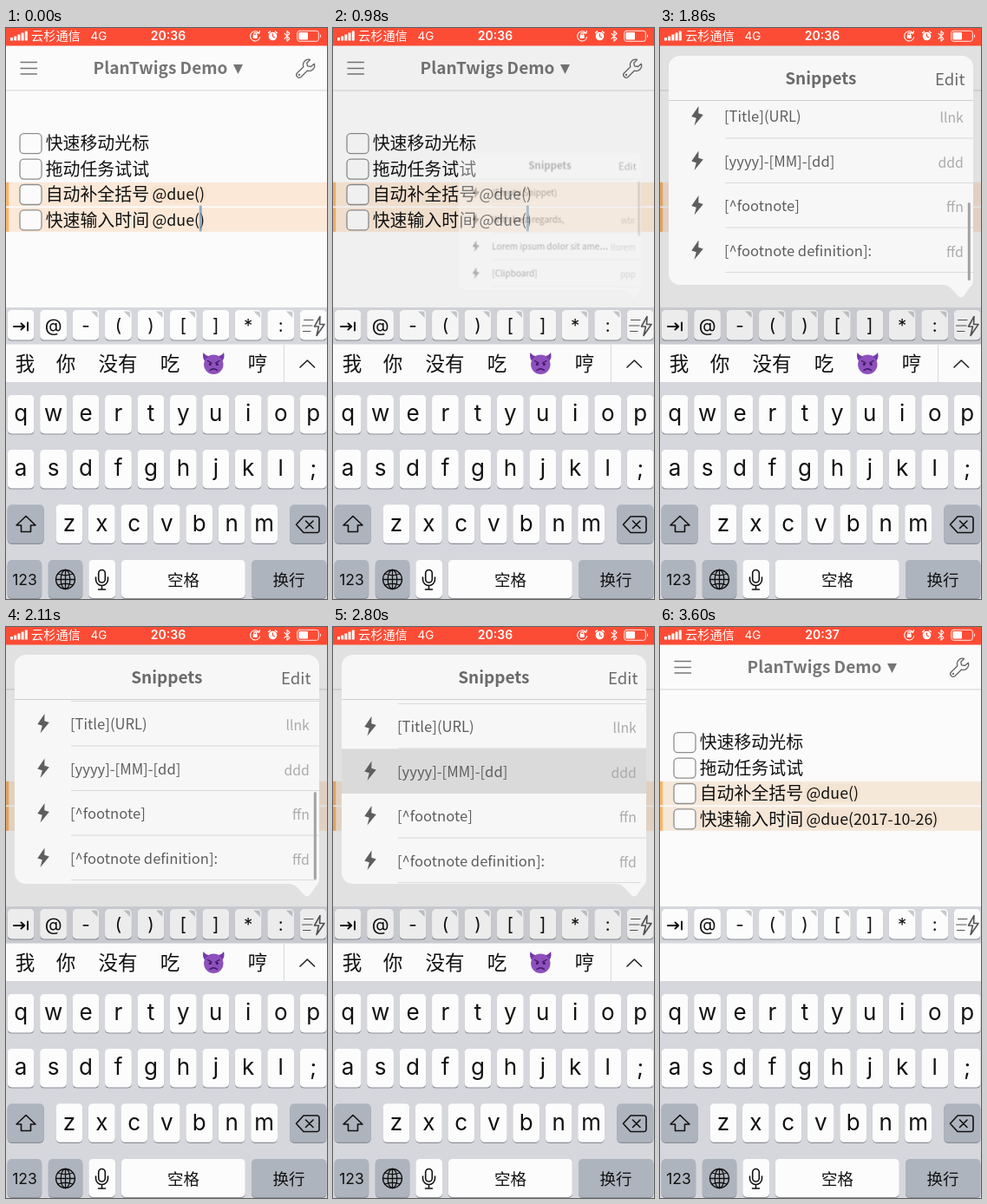
These frames come from a looping animation (370 by 658 pixels, 4000 ms). An HTML page:

```html
<!DOCTYPE html>
<html lang="zh-CN">
<head>
<meta charset="utf-8">
<title>Snippets demo</title>
<style>
html, body { margin: 0; width: 100%; height: 100%; overflow: hidden; background: #fbfbfb; }
svg { display: block; width: 370px; height: 658px; }
text { font-family: "Noto Sans CJK SC", "Noto Sans CJK", "Noto Sans", sans-serif; }
.ui { font-family: Inter, Roboto, sans-serif; }
.mid { text-anchor: middle; }
.end { text-anchor: end; }
.bold { font-weight: 700; }
.line { fill: none; stroke-linecap: round; stroke-linejoin: round; }

/* the whole loop is stepped, like a low frame rate screen recording */
.anim, .before, .after, .mark { animation: 4s step-end infinite; }
.before { animation-name: before; }
.after { animation-name: after; }
.mark { animation-name: mark; }
#caret { animation-name: blink; }
#dim { animation-name: dim; }
#pop { animation-name: pop; transform-origin: 347px 311px; }
#rows { animation-name: scroll; }
#bar { animation-name: bar; }
#pick { animation-name: pick; }

@keyframes before { 0% { opacity: 1 } 72.25%, 100% { opacity: 0 } }
@keyframes after { 0% { opacity: 0 } 72.25%, 100% { opacity: 1 } }
@keyframes mark { 0% { fill: #fbe8d7 } 72.25%, 100% { fill: #f6e8d9 } }
@keyframes blink {
  0% { opacity: .75; transform: none }
  2.25% { opacity: .3; transform: none }
  4.5% { opacity: 0; transform: none }
  15.75% { opacity: .85; transform: none }
  17.75% { opacity: 1; transform: none }
  72.25% { opacity: 1; transform: translateX(91.5px) }
  87.75% { opacity: .45; transform: translateX(91.5px) }
  90%, 100% { opacity: 0; transform: translateX(91.5px) }
}
@keyframes dim {
  0% { opacity: 0 } 22.25% { opacity: .01 } 24.5% { opacity: .04 } 26.75% { opacity: .08 }
  29% { opacity: .1 } 70.25% { opacity: .06 } 72.25% { opacity: .02 } 74.5%, 100% { opacity: 0 }
}
@keyframes pop {
  0% { opacity: 0; transform: scale(.1) }
  22.25% { opacity: .1; transform: scale(.2) }
  24.5% { opacity: .45; transform: scale(.6) }
  26.75% { opacity: .85; transform: scale(.9) }
  29% { opacity: 1; transform: scale(.98) }
  31.25% { opacity: 1; transform: none }
  70.25% { opacity: .6; transform: none }
  72.25% { opacity: .2; transform: none }
  74.5%, 100% { opacity: 0; transform: none }
}
@keyframes scroll {
  0% { transform: none }
  42.25% { transform: translateY(-40px) }
  44.5% { transform: translateY(-140px) }
  46.5% { transform: translateY(-213.5px) }
  48.5% { transform: translateY(-216px) }
  50.75% { transform: translateY(-209px) }
  52.75% { transform: translateY(-203.5px) }
  55%, 100% { transform: translateY(-200.5px) }
}
@keyframes bar {
  0% { y: 87px; height: 105px; opacity: 1 }
  42.25% { y: 107px; height: 105px; opacity: 1 }
  44.5% { y: 156px; height: 105px; opacity: 1 }
  46.5% { y: 201px; height: 90px; opacity: 1 }
  48.5% { y: 203px; height: 88px; opacity: 1 }
  50.75% { y: 196px; height: 95px; opacity: 1 }
  52.75% { y: 190px; height: 101px; opacity: 1 }
  55% { y: 187px; height: 104px; opacity: 1 }
  61.5% { y: 187px; height: 104px; opacity: .5 }
  63.5%, 100% { y: 187px; height: 104px; opacity: 0 }
}
@keyframes pick { 0% { opacity: 0 } 68% { opacity: 1 } 74.5%, 100% { opacity: 0 } }
</style>
</head>
<body>
<svg viewBox="0 0 370 658">
  <defs>
    <clipPath id="list"><path d="M10 84H361V283a13 13 0 0 1-13 13H23a13 13 0 0 1-13-13z"/></clipPath>
    <path id="bolt" d="M44.500 97.500L36.300 109.500L41.800 111.300L39.500 120L49.800 107.500L44.300 105.800Z"/>
  </defs>
  <rect width="370" height="658" fill="#fbfbfb"/>

  <!-- navigation bar -->
  <rect y="71.500" width="370" height="1" fill="#d4d4d4"/>
  <path class="line" d="M17 39.500H35.500M17 46.500H35.500M17 53H35.500" stroke="#777" stroke-width="1.300"/>
  <text class="mid bold" x="178" y="53" font-size="19" fill="#757575">PlanTwigs Demo</text>
  <path d="M262 42H273L267.500 53Z" fill="#757575"/>
  <g class="line" stroke="#666" stroke-width="1.300">
    <path d="M350.500 36.500a6.300 6.300 0 0 0-7.600 8.300L335.500 52a3.200 3.200 0 0 0 4.500 4.500L347.300 49.200a6.300 6.300 0 0 0 8-8L351.500 44.500L347.500 43.800L346.800 40.200Z"/>
    <circle cx="338" cy="54" r=".5"/>
  </g>

  <!-- document -->
  <g id="doc"></g>
  <g font-size="17.800" fill="#111">
    <rect x="167" y="181" width="64" height="21" rx="8" fill="#a05000" opacity=".035"/>
    <text x="168.500" y="198">@due()</text>
    <text class="before" x="168.500" y="227.500">@due()</text>
    <g class="after">
      <rect x="167" y="210.500" width="155" height="21" rx="8" fill="#a05000" opacity=".035"/>
      <text x="168.500" y="227.500">@due(2017-10-26)</text>
    </g>
  </g>
  <rect id="caret" class="anim" x="222.800" y="204.500" width="3" height="30" rx="1" fill="#6f97b3"/>

  <!-- keyboard -->
  <rect y="322" width="370" height="336" fill="#d5d7dd"/>
  <rect y="364.500" width="370" height="43.500" fill="#fbfbfc"/>
  <g id="keys"></g>
  <g class="line" stroke="#111" stroke-width="1.600">
    <path d="M9 344H21M17.500 340.500L21.300 344L17.500 347.500M25 339.500V348.500" stroke-width="2"/>
    <path d="M343.500 336.500H354M341.500 343H353M342.500 349.500H351" stroke="#555" stroke-width="1.100"/>
    <path d="M362 332.500L355.500 344H360.500L358 354.500L367 341.500H361.500Z" stroke="#555"/>
    <path d="M23 562.500L34 573H28.500V580.500H17.500V573H12Z"/>
    <path d="M343 563H358.500a2.500 2.500 0 0 1 2.500 2.500V579a2.500 2.500 0 0 1-2.500 2.500H343L334.500 572.300ZM345.500 568L354 576.500M354 568L345.500 576.500"/>
    <g stroke-width="1.300">
      <circle cx="68.500" cy="635.500" r="11"/>
      <ellipse cx="68.500" cy="635.500" rx="5.300" ry="11"/>
      <path d="M57.500 635.500H79.500M68.500 624.500V646.500M60 629Q68.500 632.500 77 629M60 642Q68.500 638.500 77 642"/>
    </g>
    <rect x="106.700" y="624.500" width="7.600" height="14.500" rx="3.800"/>
    <path d="M103.500 633V635.500a7 7 0 0 0 14 0V633M110.500 642.500V647M106.500 647H114.500"/>
  </g>

  <!-- word suggestions -->
  <g class="before">
    <g id="words" font-size="22.500" fill="#111"></g>
    <path d="M227.500 374Q225.500 381 230.500 385L236 378.500Q230 378 227.500 374ZM251 374Q253 381 248 385L242.500 378.500Q248.500 378 251 374Z" fill="#713aa6"/>
    <circle cx="239.300" cy="387.800" r="11.200" fill="#8e50bd"/>
    <path class="line" d="M232.500 383.500L237 386M246 383.500L241.500 386M235 394.500Q239.300 391 243.500 394.500" stroke="#3d1760" stroke-width="1.300"/>
    <circle cx="235.300" cy="387.500" r="1.500" fill="#3d1760"/>
    <circle cx="243.300" cy="387.500" r="1.500" fill="#3d1760"/>
    <rect x="320" y="365" width="1" height="43" fill="#d8d9dc"/>
    <path class="line" d="M339 391L347.300 383L355.600 391" stroke="#222" stroke-width="1.600"/>
  </g>

  <!-- popover -->
  <g id="dim" class="anim">
    <rect y="20" width="370" height="302"/>
    <rect y="322" width="370" height="42.500" opacity=".65"/>
  </g>
  <g id="pop" class="anim">
    <path d="M23 32H348a13 13 0 0 1 13 13V290q0 6-4 9L350.500 308.500q-3.500 4-7 0L335.500 300q-4-4-9-4H23a13 13 0 0 1-13-13V45a13 13 0 0 1 13-13z" fill="#f7f7f7"/>
    <text class="mid bold" x="185.300" y="64.500" font-size="19" fill="#6a6a6a">Snippets</text>
    <text class="end" x="351.500" y="65.500" font-size="18.600" fill="#6a6a6a">Edit</text>
    <g clip-path="url(#list)">
      <rect id="pick" class="anim" x="10" y="140.500" width="351" height="51.500" fill="#dadada"/>
      <g id="rows" class="anim"></g>
      <rect id="bar" class="anim" x="354.800" y="87" width="3" height="105" rx="1.500" fill="#a2a2a2"/>
    </g>
    <rect x="10" y="83" width="351" height="1" fill="#cfcfcf"/>
  </g>

  <!-- status bar -->
  <rect width="370" height="20.500" fill="#fc4c35"/>
  <g fill="#fff">
    <path d="M5 11H8V14.500H5ZM9.200 9.500H12.200V14.500H9.200ZM13.400 7.500H16.400V14.500H13.400ZM17.600 5.500H20.600V14.500H17.600ZM21.800 3.500H24.800V14.500H21.800Z"/>
    <text x="29" y="14.300" font-size="14.200">云杉通信</text>
    <text class="ui" x="97.500" y="14" font-size="13.500">4G</text>
    <g font-size="14" font-weight="600">
      <text class="ui mid before" x="187" y="14.200">20:36</text>
      <text class="ui mid after" x="187" y="14.200">20:37</text>
    </g>
    <rect x="284.700" y="8" width="5" height="4" rx=".6"/>
    <circle cx="307.500" cy="9.500" r="4.800"/>
    <path class="line" d="M302.800 5.500L304.500 4M312.200 5.500L310.500 4" stroke="#fff" stroke-width="1.600"/>
    <rect x="337.500" y="5" width="10.500" height="8.500" rx="1"/>
    <path d="M362 7V11.500q2-2.200 0-4.500z"/>
  </g>
  <g class="line" stroke="#fff" stroke-width="1.100">
    <path d="M291.500 5.800A5.600 5.600 0 1 0 292.700 10.500M292.500 3.500L291.700 6.300L289 5.700M285.800 8V7a1.400 1.400 0 0 1 2.800 0V8"/>
    <path d="M307.500 6.800V9.700L309.500 10.700" stroke="#fc4c35"/>
    <path d="M321 6.300L327 12.300L324 15.200V3.300L327 6.300L321 12.300"/>
    <rect x="335.800" y="3.300" width="24.500" height="12" rx="2.500" stroke-width=".9"/>
  </g>
</svg>

<script>
const $ = id => document.getElementById(id);
const PITCH = 37.45;

const tasks = ['快速移动光标', '拖动任务试试', '自动补全括号', '快速输入时间'];
$('doc').innerHTML = tasks.map((name, i) => {
  const y = 133 + i * 29.4;
  const mark = i < 2 ? '' :
    `<rect class="mark" y="${y - 14}" width="370" height="27.6"/>
     <rect y="${y - 14}" width="3.2" height="27.6" fill="#f6b56c"/>`;
  return `${mark}<rect x="16" y="${y - 11.3}" width="25" height="23" rx="4.5"
    fill="#fbfbfb" stroke="#8e8e8e" stroke-width="1.3"/>
    <text x="45.700" y="${y + 7.3}" font-size="19.900" fill="#111">${name}</text>`;
}).join('');

function key(x, y, w, h, dark) {
  const box = (dy, fill) =>
    `<rect x="${x}" y="${y + dy}" width="${w}" height="${h}" rx="4.8" fill="${fill}"/>`;
  return box(1.1, '#8c8f95') + box(0, dark ? '#aeb4be' : '#fcfcfd');
}
function label(str, x, y, size, cls = 'ui') {
  return `<text class="mid ${cls}" x="${x}" y="${y}" font-size="${size}" fill="#111">${str}</text>`;
}
function row(chars, x0, y) {
  return [...chars].map((c, i) => {
    const x = x0 + i * PITCH;
    return key(x, y, 30.8, 44.5) + label(c, x + 15.4, y + 30.3, 26);
  }).join('');
}

// a blank stands for a key with a drawn icon
const symbols = [...' @-()[]*: '].map((c, i) => {
  const x = 1.7 + i * PITCH;
  const fold = '-()[*:'.includes(c)
    ? `<path d="M${x + 21.5} 326.500H${x + 26}q3 0 3 3V334z" fill="#c6c8cc"/>` : '';
  return key(x, 325, 30.8, 34.5) + fold + label(c, x + 15.4, 350, 20.5);
}).join('');

$('keys').innerHTML = symbols
  + row('qwertyuiop', 1.7, 423)
  + row('asdfghjkl;', 1.7, 486)
  + row('zxcvbnm', 57.5, 549.3)
  + key(1.7, 549.3, 42, 44.5, true) + key(327.3, 549.3, 42, 44.5, true)
  + key(1.7, 613, 39.5, 44, true) + key(48.8, 613, 39.5, 44, true)
  + key(95.3, 613, 30.8, 44) + key(132.8, 613, 143, 44) + key(283, 613, 86.3, 44, true)
  + label('123', 21.5, 642, 17.5)
  + label('空格', 204.5, 642.5, 18.5, '') + label('换行', 326, 642.5, 18.5, '');

$('words').innerHTML = [['我', 22], ['你', 69], ['没有', 129], ['吃', 189], ['哼', 290]]
  .map(([w, x]) => `<text class="mid" x="${x}" y="395">${w}</text>`).join('');

const snippets = [
  ['(Empty Snippet)', ''],
  ['With best regards,', 'wbr'],
  ['Lorem ipsum dolor sit ame<tspan font-family="Noto Sans, sans-serif" font-size="21">…</tspan>', 'llorem'],
  ['[Clipboard]', 'ppp'],
  ['[Title](URL)', 'llnk'],
  ['[yyyy]-[MM]-[dd]', 'ddd'],
  ['[^footnote]', 'ffn'],
  ['[^footnote definition]:', 'ffd']
];
$('rows').innerHTML = snippets.map(([name, tag], i) =>
  `<g transform="translate(0 ${i * 51.5})">
    <use href="#bolt" fill="#5e5e5e"/>
    <text x="74" y="115.800" font-size="16.600" fill="#5e5e5e">${name}</text>
    <text class="end" x="349.800" y="116.500" font-size="15.800" fill="#ababab">${tag}</text>
    <rect x="75" y="134" width="286" height="1" fill="#dadada"/>
  </g>`).join('');
</script>
</body>
</html>
```
